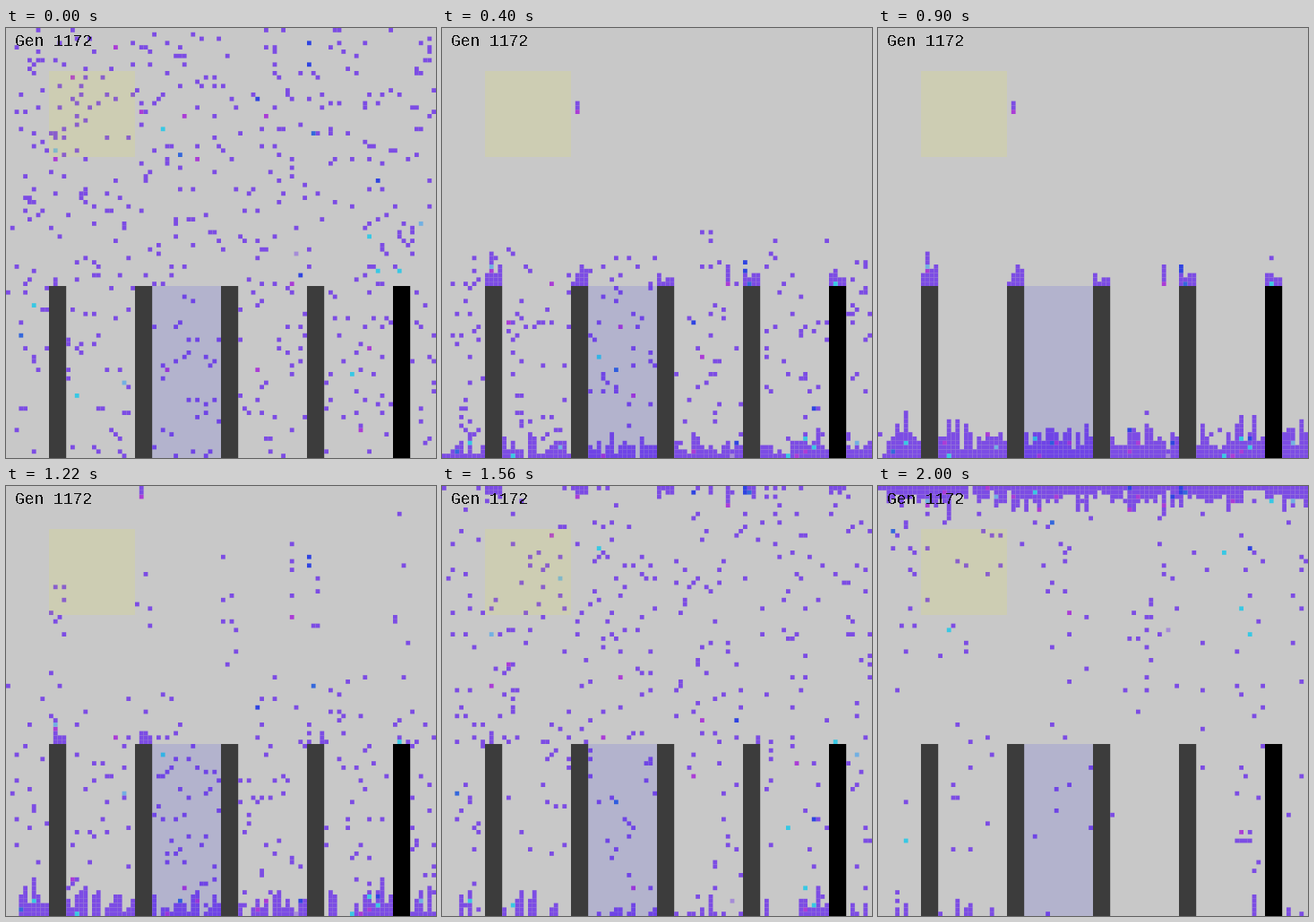
A matplotlib script that plays this animation: 480 px wide and 480 px high, repeating every 2.02 s.

```python
import random

import numpy as np
import matplotlib.pyplot as plt
from matplotlib.animation import FuncAnimation
from matplotlib.collections import PolyCollection
from matplotlib.patches import Rectangle

SIZE, GRID = 480, 100
CELL = SIZE / GRID
FRAMES, STRIDE, POPULATION = 101, 3, 500
WALLS, WALL_W, WALL_TOP = range(10, GRID, 20), 4, 60

# Chance per step to drop, to climb, and to turn from dropping to climbing
FALL, RISE, RELEASE = 0.88, 0.97, 0.056
TURN_STEP, TURN_RAMP = 127, 20

# Agent colours and their shares
COLORS = {"#7c4ce4": 470, "#ab3cd6": 9, "#38c8e4": 5, "#72b0e2": 6,
          "#2f44e2": 4, "#3468dc": 3, "#a68cd8": 2, "#b4d2de": 1}
# Two agents hang in mid-air until the turn
HUNG, HUNG_COLOR = [(31, 19), (66, 59)], "#ab3cd6"


def floor_row(col):
    in_wall = any(w <= col < w + WALL_W for w in WALLS)
    return WALL_TOP - 1 if in_wall else GRID - 1


def populate(rng):
    """Scatter the agents over the free cells and pick their colours."""
    free = [(c, r) for c in range(GRID) for r in range(floor_row(c) + 1)
            if (c, r) not in HUNG]
    count = POPULATION - len(HUNG)
    cells = HUNG + rng.sample(free, count)
    colors = [HUNG_COLOR] * len(HUNG) + rng.choices(
        list(COLORS), weights=list(COLORS.values()), k=count)
    return cells, colors


def simulate(cells, rng):
    """Rows of all agents, one line per frame."""
    rows = [r for _, r in cells]
    halts = [r if (c, r) in HUNG else floor_row(c) for c, r in cells]
    awake = [False] * len(cells)
    taken = set(cells)

    history = []
    for step in range(FRAMES * STRIDE):
        if step % STRIDE == 0:
            history.append(list(rows))
        ramp = min(1, max(0, (step - TURN_STEP) / TURN_RAMP))
        for i, (c, _) in enumerate(cells):
            r = rows[i]
            clear_above = r > 0 and (c, r - 1) not in taken
            if clear_above and not awake[i]:
                awake[i] = rng.random() < RELEASE * ramp
            if awake[i]:
                move = -1 if clear_above and rng.random() < RISE else 0
            else:
                clear_below = r < halts[i] and (c, r + 1) not in taken
                move = 1 if clear_below and rng.random() < FALL else 0
            if move:
                taken.remove((c, r))
                rows[i] = r + move
                taken.add((c, rows[i]))
    return np.array(history)


rng = random.Random(1172)
cells, colors = populate(rng)
cols = np.array([c for c, _ in cells])
history = simulate(cells, rng)
SQUARE = np.array([(0, 0), (1, 0), (1, 1), (0, 1)])


def squares(frame):
    corners = np.stack([cols, history[frame]], axis=1)
    return (corners[:, None, :] + SQUARE) * CELL


fig = plt.figure(figsize=(SIZE / 100, SIZE / 100), dpi=100, facecolor="#c8c8c8")
ax = fig.add_axes([0, 0, 1, 1])
ax.set_xlim(0, SIZE)
ax.set_ylim(SIZE, 0)
ax.axis("off")


def block(x, y, w, h, color, alpha=1, z=2):
    ax.add_patch(Rectangle((x * CELL, y * CELL), w * CELL, h * CELL,
                           facecolor=color, alpha=alpha, linewidth=0,
                           snap=False, zorder=z))


for left in WALLS:
    color = "black" if left == WALLS[-1] else "#3c3c3c"
    block(left, WALL_TOP, WALL_W, GRID - WALL_TOP, color)
block(10, 10, 20, 20, "#ffff00", 0.1, 4)
block(34, WALL_TOP, 16, GRID - WALL_TOP, "#0000ff", 0.1, 4)

swarm = PolyCollection(squares(0), facecolors=colors, edgecolors="none",
                       linewidths=0, zorder=3)
swarm.set_snap(False)
ax.add_collection(swarm, autolim=False)

ax.text(10, 20, "Gen 1172", family="Liberation Mono", fontsize=18 * 0.72,
        color="#101010", va="baseline", antialiased=False, zorder=5)


def update(frame):
    swarm.set_verts(squares(frame))
    return (swarm,)


anim = FuncAnimation(fig, update, frames=FRAMES, interval=20, repeat=True,
                     repeat_delay=0)
plt.show()
```
